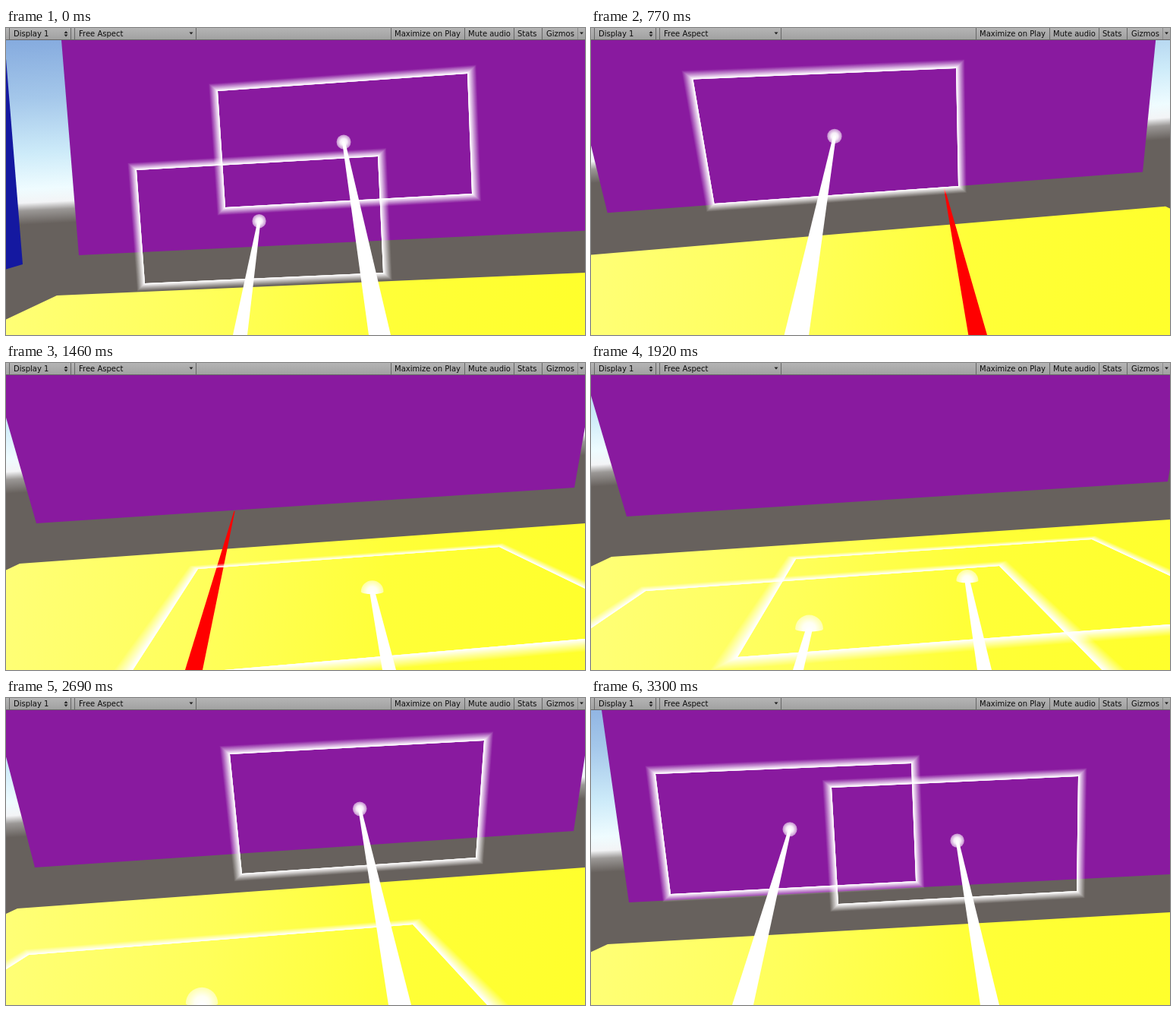
Recreate the animation shown at these times as an HTML page with a canvas. Size 763 px wide and 404 px high, loop 3380 ms.

```html
<!DOCTYPE html>
<html lang="en">
<head>
<meta charset="utf-8">
<title>Laser pointers</title>
<style>
html, body { margin: 0; width: 100%; height: 100%; overflow: hidden; background: #67615d; }
canvas { display: block; }
</style>
</head>
<body>
<canvas id="stage" width="763" height="404"></canvas>
<script>
const ctx = document.getElementById('stage').getContext('2d');
const W = 763, H = 404, BAR = 16, LOOP = 3380, STEPS = 44;
const WALL = 0, FLOOR = 1, NONE = 2;

// step, wall: topLeftX, leftX, leftY, rightX, rightY, topRightX,
// floor: cornerX, cornerY, rightY, beam feet: left pair, right pair
const VIEW = [
  [0, 73, 96, 299, 800, 265, 805, 67, 352, 322, 299, 318, 478, 507],
  [6, -14, 33, 261, 738, 211, 751, 5, 316, 258, 285, 313, 502, 529],
  [14, -38, 22, 228, 728, 174, 749, -6, 284, 218, 227, 261, 490, 512],
  [19, -16, 40, 211, 749, 164, 775, 18, 264, 211, 236, 259, 496, 514],
  [25, -8, 47, 202, 760, 156, 784, 27, 255, 206, 266, 280, 509, 528],
  [35, -16, 38, 223, 748, 175, 772, 15, 277, 223, 251, 265, 504, 534],
  [43, 14, 50, 269, 764, 232, 778, 22, 324, 282, 186, 214, 513, 538]
];

// step, surface, then the inner corners clockwise from top left (or only the tip)
const LEFT = [
  [0, WALL, 172, 187, 490, 169, 497, 322, 183, 336],
  [6, WALL, 165, 107, 500, 92, 503, 242, 186, 264],
  [14, WALL, 104, 28, 462, 14, 465, 174, 139, 198],
  [19, NONE, 301, 195],
  [25, FLOOR, 72, 300, 538, 267, 719, 450, -274, 536],
  [35, FLOOR, 30, 338, 536, 298, 764, 544, -546, 703],
  [43, WALL, 85, 100, 422, 86, 428, 241, 105, 258]
];
const RIGHT = [
  [0, WALL, 279, 83, 608, 60, 614, 218, 289, 236],
  [6, WALL, 303, 103, 625, 86, 622, 236, 316, 255],
  [14, FLOOR, 299, 239, 588, 215, 704, 263, 268, 301],
  [19, FLOOR, 253, 271, 650, 242, 879, 353, 160, 415],
  [25, FLOOR, 270, 258, 660, 232, 881, 335, 193, 387],
  [35, WALL, 295, 74, 630, 56, 619, 210, 311, 231],
  [43, WALL, 317, 118, 642, 103, 640, 254, 326, 271]
];

const mix = (a, b, u) => a.map((x, i) => x + (b[i] - x) * u);

function segment(keys, k) {
  let i = 0;
  while (i < keys.length - 2 && keys[i + 1][0] <= k) i++;
  return [i, (k - keys[i][0]) / (keys[i + 1][0] - keys[i][0])];
}

function spline(keys, k) {
  const [i, u] = segment(keys, k);
  const a = keys[i], b = keys[i + 1], p = keys[i - 1] || a, n = keys[i + 2] || b;
  const span = b[0] - a[0], u2 = u * u, u3 = u2 * u;
  return a.map((x, j) => {
    const m0 = (b[j] - p[j]) / (b[0] - p[0]) * span;
    const m1 = (n[j] - x) / (n[0] - a[0]) * span;
    return x * (2 * u3 - 3 * u2 + 1) + m0 * (u3 - 2 * u2 + u) + b[j] * (3 * u2 - 2 * u3) + m1 * (u3 - u2);
  });
}

// maps the unit square onto a quad in perspective
function projector([x0, y0, x1, y1, x2, y2, x3, y3]) {
  const ax = x1 - x2, ay = y1 - y2, bx = x3 - x2, by = y3 - y2;
  const sx = x0 - x1 + x2 - x3, sy = y0 - y1 + y2 - y3, d = ax * by - bx * ay;
  const g = (sx * by - bx * sy) / d, h = (ax * sy - sx * ay) / d;
  return (u, v) => {
    const w = g * u + h * v + 1;
    return [((x1 - x0 + g * x1) * u + (x3 - x0 + h * x3) * v + x0) / w,
            ((y1 - y0 + g * y1) * u + (y3 - y0 + h * y3) * v + y0) / w];
  };
}

const center = q => q.length === 2 ? q : projector(q)(.5, .5);

function trace(points) {
  points.forEach(([x, y], i) => i ? ctx.lineTo(x, y) : ctx.moveTo(x, y));
  ctx.closePath();
}

function poly(color, ...points) {
  ctx.fillStyle = color;
  ctx.beginPath();
  trace(points);
  ctx.fill();
}

function gradient(g, ...stops) {
  stops.forEach(([at, color]) => g.addColorStop(at, color));
  return g;
}

function makeScene(v) {
  const [, tl, lx, ly, rx, ry, tr, fx, fy, fr] = v;
  const tilt = (ry - ly) / (rx - lx), fall = (fr - fy) / (W - fx);
  return {
    tl, lx, ly, rx, ry, tr, fx, fy, tilt, fall,
    sky: x => ly - 59 + tilt * x,
    wallEnd: x => ly + tilt * (x - lx),
    floorStart: x => fy + fall * (x - fx)
  };
}

function drawScene(s) {
  ctx.save();
  ctx.transform(1, s.tilt, 0, 1, 0, s.sky(0));
  ctx.fillStyle = gradient(ctx.createLinearGradient(0, -240, 0, 20),
    [0, '#7fa5dc'], [.36, '#a4c7ea'], [.64, '#cdebf9'], [.82, '#effcff'],
    [.89, '#f3f4f6'], [.93, '#9b9896'], [1, '#67615d']);
  ctx.fillRect(0, -500, W, 1100);
  ctx.restore();

  const lean = (s.lx - s.tl) / (s.ly - BAR), bx = s.lx - 74, by = s.ly + 12;
  poly('#1418a0', [bx - lean * by, 0], [bx, by], [bx - 100, by + 30], [bx - 200, 0]);
  poly('#891a9f', [s.tl, BAR], [s.tr, BAR], [s.rx, s.ry], [s.lx, s.ly]);

  const edge = s.rx + 30;
  const yellow = gradient(ctx.createLinearGradient(0, 300, W, 370),
    [0, '#ffff76'], [.35, '#ffff5a'], [.65, '#ffff38'], [1, '#ffff2c']);
  poly(yellow, [s.fx, s.fy], [edge, s.floorStart(edge)], [edge + 500, s.floorStart(edge) + 235],
    [edge + 500, 700], [s.fx - 800, 700], [s.fx - 800, s.fy + 376]);
}

function findHand(keys, k, s) {
  const [i, u] = segment(keys, k), a = keys[i], b = keys[i + 1];
  const qa = a.slice(2), qb = b.slice(2);
  if (a[1] === b[1]) {
    const quad = mix(qa, qb, u);
    return { on: a[1], quad, tip: center(quad) };
  }
  const tip = mix(center(qa), center(qb), u), [x, y] = tip;
  const on = y < s.wallEnd(x) ? WALL : y > s.floorStart(x) ? FLOOR : NONE;
  const shape = on === a[1] ? qa : on === b[1] ? qb : [];
  if (shape.length < 8) return { on: NONE, tip };
  const c = center(shape);
  const size = on === FLOOR ? (y - s.sky(x)) / (c[1] - s.sky(c[0])) : 1;
  return { on, tip, quad: shape.map((p, j) => tip[j % 2] + (p - c[j % 2]) * size) };
}

function drawBeam({ on, tip: [x, y], quad }, l, r) {
  if (on === NONE) return poly('#f00', [x - .6, y], [x + .6, y], [r, H], [l, H]);
  const at = projector(quad), a = at(0, .5), b = at(1, .5);
  const size = Math.hypot(b[0] - a[0], b[1] - a[1]) * .029;
  ctx.fillStyle = gradient(ctx.createRadialGradient(x, y, 0, x, y, size),
    [0, '#fff'], [.45, 'rgba(255,255,255,.93)'], [1, 'rgba(255,255,255,.5)']);
  ctx.beginPath();
  if (on === FLOOR) {
    ctx.arc(x, y, size, Math.PI, 0);
    ctx.ellipse(x, y, size, size * .2, 0, 0, Math.PI);
  } else ctx.arc(x, y, size, 0, 7);
  ctx.fill();
  const half = on === FLOOR ? size * .24 : 2;
  if (y < H) poly('#fff', [x - half, y], [x + half, y], [r, H], [l, H]);
}

// glow fading outward from a crisp inner edge
function drawFrame({ quad }) {
  if (!quad) return;
  const at = projector(quad), layers = 14;
  const ring = m => {
    const u = .035 * m, v = .066 * m;
    trace([at(-u, -v), at(1 + u, -v), at(1 + u, 1 + v), at(-u, 1 + v)]);
  };
  for (let n = layers; n > 0; n--) {
    ctx.fillStyle = `rgba(255,255,255,${1 / n})`;
    ctx.beginPath();
    ring(n / layers);
    ring(0);
    ctx.fill('evenodd');
  }
}

function drawBar() {
  ctx.fillStyle = gradient(ctx.createLinearGradient(0, 0, 0, BAR), [0, '#b4b4b4'], [1, '#a0a0a0']);
  ctx.fillRect(0, 0, W, BAR);
  ctx.fillStyle = '#666';
  ctx.fillRect(0, 15, W, 1);
  for (const x of [4, 85, 90, 250, 507, 604, 669, 706]) ctx.fillRect(x, 0, 1, 15);
  ctx.fillStyle = '#8a8a8a';
  ctx.fillRect(753, 0, 1, 15);
  ctx.fillStyle = '#0c0c0c';
  ctx.font = '10px "DejaVu Sans", sans-serif';
  [['Display 1', 10], ['Free Aspect', 96], ['Maximize on Play', 512],
   ['Mute audio', 609], ['Stats', 674], ['Gizmos', 712]].forEach(([text, x]) => ctx.fillText(text, x, 11));
  const arrow = (x, y, d) => poly('#222', [x - 2.5, y], [x + 2.5, y], [x, y + d]);
  arrow(79, 7, -3);
  arrow(79, 8.5, 3);
  arrow(244, 5.5, 3);
  arrow(758.5, 5.5, 3);
}

function draw(now) {
  const k = Math.min(STEPS - 1, Math.floor((now % LOOP + 5) / (LOOP / STEPS)));
  const view = spline(VIEW, k), s = makeScene(view);
  const hands = [findHand(LEFT, k, s), findHand(RIGHT, k, s)];
  drawScene(s);
  hands.forEach((hand, i) => drawBeam(hand, view[10 + 2 * i], view[11 + 2 * i]));
  hands.forEach(drawFrame);
  drawBar();
}

const start = performance.now();
function tick() {
  draw(performance.now() - start);
  requestAnimationFrame(tick);
}
tick();
</script>
</body>
</html>
```
